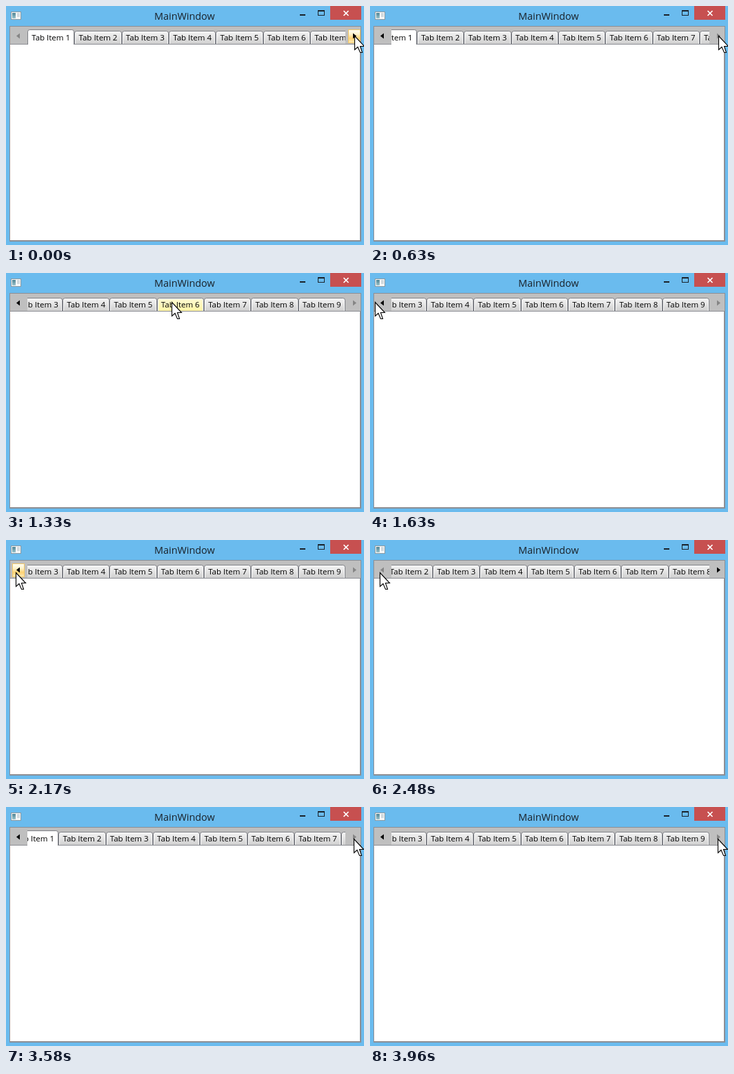
Write an HTML page with a canvas that moves like this. It is 519 px wide and 347 px high and loops after 4260 ms.

```html
<!DOCTYPE html>
<html lang="en">
<head>
<meta charset="utf-8">
<title>MainWindow</title>
<style>
html, body { margin: 0; width: 100%; height: 100%; overflow: hidden; background: #6abbee; }
canvas { display: block; }
</style>
</head>
<body>
<canvas id="stage" width="519" height="347"></canvas>
<script>
const c = document.getElementById('stage').getContext('2d');
const LOOP = 4260, STEP = LOOP / 55;
const MAX = 154, SCROLL = 500;              // scroll range in px, duration in ms
const CLICKS = [[460, MAX], [2228, 0], [3426, MAX]];
const LEFT = 31, RIGHT = 492, PITCH = 68.33;
const FONT = '"Open Sans", "Noto Sans", sans-serif';
const INK = '#1a222a', LINE = '#8c8e94';

// Pointer path: step, x, y
const PATH = [
  [0, 505, 43], [13, 505, 43], [14, 480, 42], [16, 330, 42], [18, 150, 42],
  [19, 70, 42], [20, 20, 41], [21, 7, 42], [24, 7, 42], [25, 9, 44],
  [26, 14, 47], [32, 14, 47], [33, 20, 50], [34, 62, 51], [35, 140, 50],
  [36, 235, 48], [37, 332, 48], [38, 412, 48], [39, 459, 47], [40, 488, 48],
  [41, 504, 46], [55, 504, 46]
];
const ARROW = new Path2D('M.5 .5V20.5L5 16.5L8.5 24.5H11.5L8.5 15.5H14.5Z');

function rect(color, x, y, w, h) {
  c.fillStyle = color;
  c.fillRect(x, y, w, h);
}

function gradient(y0, y1, ...colors) {
  const g = c.createLinearGradient(0, y0, 0, y1);
  colors.forEach((color, i) => g.addColorStop(i / (colors.length - 1), color));
  return g;
}

function text(s, x, y, size, color) {
  c.font = size + 'px ' + FONT;
  c.fillStyle = color;
  c.fillText(s, x, y);
}

function pointer(n) {
  const i = Math.max(1, PATH.findIndex(k => k[0] >= n));
  const [n0, x0, y0] = PATH[i - 1], [n1, x1, y1] = PATH[i];
  const p = (n - n0) / (n1 - n0);
  return [Math.round(x0 + (x1 - x0) * p), Math.round(y0 + (y1 - y0) * p)];
}

// Constant acceleration, then constant deceleration
function ease(p) {
  p = Math.min(1, p);
  return p < .5 ? 2 * p * p : 1 - 2 * (1 - p) ** 2;
}

function scrollAt(t) {
  let offset = 0, target = 0;
  for (const [start, to] of CLICKS) {
    if (t < start) break;
    offset = target + (to - target) * ease((t - start) / SCROLL);
    target = to;
  }
  return { offset, target };
}

function drawWindow() {
  rect('#6abbee', 0, 0, 519, 347);
  rect(LINE, 5, 29, 510, 313);
  rect('#bfbfbf', 6, 30, 508, 25);
  rect('#fff', 6, 56, 507, 284);

  rect('#8a9aa3', 7, 8, 15, 12);
  rect('#f6f8f9', 8, 9, 13, 10);
  rect(gradient(10, 18, '#4f8494', '#9cc4cc'), 9, 10, 5, 8);
  rect('#d3dade', 16, 10, 4, 6);

  text('MainWindow', 215, 20, 14.4, INK);
  rect(INK, 426, 12, 8, 2);
  rect(INK, 452, 6, 10, 8);
  rect('#6abbee', 453, 8, 8, 5);
  rect('#c75050', 470, 0, 45, 20);
  c.strokeStyle = '#fff';
  c.lineWidth = 1.7;
  c.beginPath();
  c.moveTo(489.5, 7); c.lineTo(496.5, 14);
  c.moveTo(496.5, 7); c.lineTo(489.5, 14);
  c.stroke();
}

// Outline of a tab, drawn inward by d pixels
function tabOutline(x, end, top, d, radius, color) {
  const l = x + d + .5, r = end - d - .5, t = top + d + .5;
  c.beginPath();
  c.moveTo(l, 56);
  c.arcTo(l, t, r, t, radius);
  c.arcTo(r, t, r, 56, radius);
  c.lineTo(r, 56);
  c.strokeStyle = color;
  c.lineWidth = 1;
  c.stroke();
}

function drawTab(i, offset, mx, my) {
  const edge = LEFT + PITCH * i - offset;
  const x = Math.round(edge), end = Math.round(edge + PITCH);
  const selected = i === 0, top = selected ? 34 : 36;
  const hover = mx >= Math.max(x, LEFT) && mx < Math.min(end, RIGHT) && my >= 36 && my < 55;
  const fill = selected ? '#fff'
    : hover ? gradient(36, 55, '#fffcd8', '#fff4a4')
    : gradient(36, 55, '#f3f3f3', '#ebebeb', '#dddddd', '#cfcfcf');
  rect(fill, x + 1, top + 1, end - x - 2, 56 - top - 1);
  tabOutline(x, end, top, 1, 2, '#fbfbfb');
  tabOutline(x, end, top, 0, 3, '#7f8187');
  if (!selected) rect(LINE, x, 55, end - x, 1);
  text('Tab Item ' + (i + 1), edge + 6.2, 50, 11.5, '#000');
}

function drawButton(cx, dir, enabled, mx, my) {
  if (enabled && Math.abs(mx - cx) < 9 && my >= 34 && my < 54) {
    rect(gradient(35, 53, '#fffdf4', '#fff3cc', '#ffd272', '#ffe9b4'), cx - 8, 35, 17, 18);
    c.strokeStyle = '#f3c869';
    c.lineWidth = 1;
    c.strokeRect(cx - 8.5, 34.5, 17, 19);
  }
  c.fillStyle = enabled ? '#000' : '#858585';
  c.beginPath();
  c.moveTo(cx - 2 * dir, 39.5);
  c.lineTo(cx + 3 * dir, 43.5);
  c.lineTo(cx - 2 * dir, 47.5);
  c.fill();
}

function drawPointer(x, y) {
  c.save();
  c.translate(x, y);
  c.fillStyle = '#fff';
  c.strokeStyle = '#000';
  c.lineWidth = 1.1;
  c.fill(ARROW);
  c.stroke(ARROW);
  c.restore();
}

function frame(now) {
  const n = Math.floor(((now % LOOP) + 15) / STEP) % 55;
  const { offset, target } = scrollAt(n * STEP);
  const [mx, my] = pointer(n);

  drawWindow();
  c.save();
  c.beginPath();
  c.rect(LEFT, 30, RIGHT - LEFT, 26);
  c.clip();
  for (let i = 0; i < 9; i++) drawTab(i, offset, mx, my);
  c.restore();
  drawButton(18, -1, target > 0, mx, my);
  drawButton(505, 1, target < MAX, mx, my);
  drawPointer(mx, my);
  requestAnimationFrame(frame);
}

frame(0);
</script>
</body>
</html>
```
